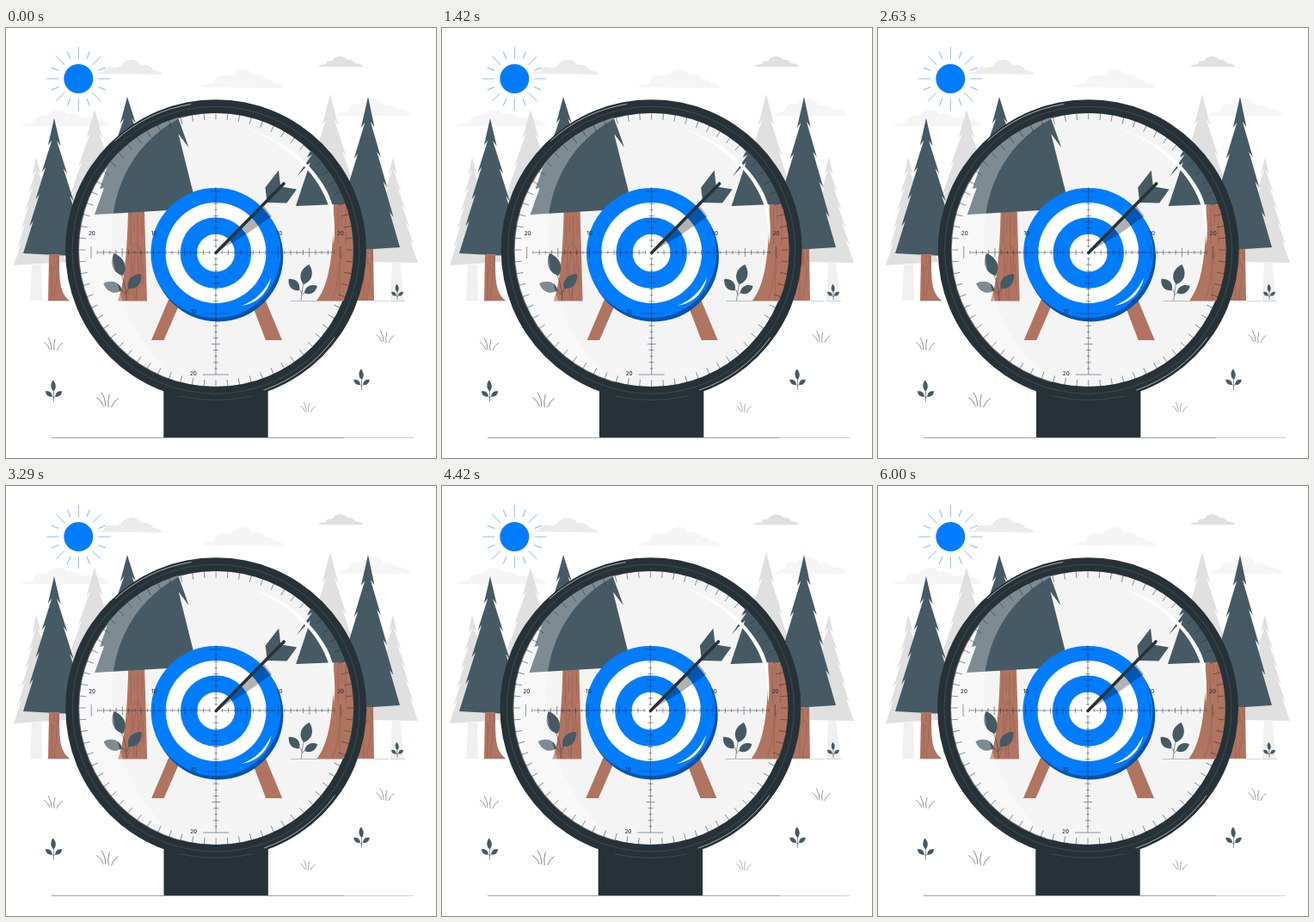
An HTML page that plays this animation: 500x500 px, repeating every 6.04 s.

```html
<!DOCTYPE html>
<html lang="en">
<head>
<meta charset="utf-8">
<style>
html, body { margin: 0; width: 100%; height: 100%; overflow: hidden; background: #fff; }
svg { display: block; width: 100vw; height: 100vh; }
text { font: 500 6.2px Inter, "Open Sans", sans-serif; fill: #263238; text-anchor: middle; }
.line { fill: none; stroke: #263238; stroke-width: .5; }
.grain { fill: none; stroke: #7c4a3c; stroke-width: .4; stroke-opacity: .8; }
.wood { fill: #b07461; }
.dark { fill: #455a64; }
.ink { fill: #263238; }
.blue { fill: #007cff; }
</style>
</head>
<body>
<svg viewBox="0 0 500 500">
  <defs><clipPath id="lens"><circle cx="244" cy="258" r="160"/></clipPath></defs>

  <g id="sky">
    <path fill="#ebebeb" d="M103 53c3-2 8-1 11-2 0-5 6-7 11-5 4 1 6-1 9-2 3-6 11-9 17-6 4 0 5 6 9 5 6-1 9 3 12 6 4 1 9 1 10 5z"/>
    <path fill="#f5f5f5" d="M228 69c2-5 10-3 14-5 0-7 8-11 15-9 4 1 6-1 8-3 7-6 18-6 22 3 6-3 13-1 16 5 4-2 8 1 9 4 5-1 10 1 11 6z"/>
    <path fill="#e0e0e0" d="M363 45c2-3 6-2 9-3 0-3 4-5 7-3 3-7 14-8 18-2 5-1 7 2 9 4 4 0 8 1 9 4z"/>
    <path fill="#f5f5f5" d="M18 114c2-5 10-3 14-5 1-6 9-8 15-7 7-9 19-9 24-2 6-2 14 0 18 5 12-3 28 2 32 9z"/>
    <path fill="#f5f5f5" d="M386 102c3-5 8-3 12-6 1-7 8-9 14-7 8-9 21-9 27 1 7-2 13 1 16 5 6-2 14 1 15 7z"/>
    <circle class="blue" cx="84.300" cy="59" r="17"/>
    <g id="rays" stroke="#007cff" stroke-width=".5"></g>
  </g>

  <g id="woods"></g>
  <path fill="#f0f0f0" d="M30 275h11l1 42H28zM449 272h9l5 45h-16z"/>
  <path class="wood" d="M50 263h12c0 30 0 45 12 54H49zM412 257h15l1 60h-23z"/>
  <path class="grain" d="M53 317V290c0-14 7-16 6 0s-4 14-2 27M56 265v9m-3 1v8m7-18v12M416 317V285c0-16 9-18 8 0s-5 18-4 32M416 259v13m4-13v18m5-17v10"/>
  <path class="line" stroke-opacity=".4" d="M48 317.500h26M428 317.500h17M447 317.500h17"/>
  <g id="grass" class="line"></g>
  <g id="sprouts"></g>

  <g id="scope">
    <path class="ink" d="M183.300 415h121.400v61H183.300z"/>
    <circle class="ink" cx="244" cy="258.200" r="175"/>
    <circle cx="244" cy="258" r="159" fill="#f4f4f4"/>
    <g clip-path="url(#lens)">
      <path class="wood" d="M142 213h19l3 104.500h-34c8-20 11-60 12-104.500zM381 203h30v114.500h-50c18-22 20-70 20-114.500z"/>
      <path class="grain" d="M145 216v38m4-35v20m4-22v42m5-40v24M146 264c0-18 12-18 11 5s-6 26-5 47M149 316c-2-26-1-55 3-52s0 28-1 52M140 317c5-11 6-25 6-53m13 10v25M386 209v42m4-44v22m5-22v45M388 317c0-19-1-45 4-56M379 316c7-12 9-38 9-62"/>
      <path class="line" stroke-opacity=".6" d="M331 317.500h30"/>
      <path class="dark" d="M103 217l11-31-5 1 19-55 30-45h30l12 17 12.500 35-12-16 17 68-30 21zM369 118l-19 32 6-3-18 26 16-17-17 51 73-3V130z"/>
      <g id="bushes"></g>

      <path class="wood" d="M189 316h15l-20.500 47H169zM284 316h17.500l19.500 47h-19z"/>
      <circle cx="246.500" cy="265.700" r="75.800" fill="#0053ad"/>
      <circle class="blue" cx="244" cy="261.500" r="75.600"/>
      <circle cx="244" cy="261.500" r="58.500" fill="#fff"/>
      <circle class="blue" cx="244" cy="261.500" r="41.300"/>
      <circle cx="244" cy="261.500" r="22" fill="#fff"/>
      <path d="M244 261l56-54 9 12-30 21z" opacity=".3"/>
      <path fill="#fff" d="M274 323c16-6 27-17 34.500-33-4 18-16 30-34.500 33z"/>
      <path class="dark" d="M317 165.500l-15.500 20 2 17 16-16zM303.500 203l23 .5 11.500-16-18-3z"/>
      <path d="M244 261.500L323 181" stroke="#263238" stroke-width="3.600" stroke-linecap="round"/>

      <path fill="#fff" opacity=".3" d="M210 101C150 128 123 185 123 240c0 80 37 140 82 172l-90 20-60-130V110l90-40z"/>
      <path fill="#fff" d="M266 114c44 8 84 36 104 70 5 8 8 16 10 24 2 15 3 29 1 44-1-18-2-31-5-43-7-21-17-36-31-50-22-22-46-38-79-45z"/>
    </g>
    <g id="marks" class="line"></g>
    <g id="numbers"></g>
    <g fill="none" stroke="#52656e" stroke-width=".5">
      <circle cx="244" cy="258.200" r="167"/>
      <path d="M202 428q42 9 84 0"/>
    </g>
    <path fill="none" stroke="#fff" stroke-width=".7" stroke-linecap="round" stroke-opacity=".85"
      d="M127 131A172.500 172.500 0 0 1 215 88.500M300 421A172 172 0 0 0 382 360"/>
  </g>
  <path class="line" stroke-opacity=".9" d="M53 476.500h340"/>
  <path class="line" stroke-opacity=".45" d="M393 476.500h81"/>
</svg>

<script>
const NS = 'http://www.w3.org/2000/svg';
const byId = id => document.getElementById(id);

function add(parent, tag, attrs, text) {
  const el = document.createElementNS(NS, tag);
  for (const key in attrs) el.setAttribute(key, attrs[key]);
  if (text) el.textContent = text;
  byId(parent).append(el);
}

// Jagged side of a conifer, from its tip to a lower corner.
function side([tipX, tipY], [baseX, baseY], tiers) {
  const points = [];
  const out = Math.sign(baseX - tipX);
  for (let i = 1; i <= tiers; i++) {
    const k = i / tiers;
    const x = tipX + (baseX - tipX) * k;
    const y = tipY + (baseY - tipY) * k;
    points.push([x, y]);
    if (i < tiers) points.push([x - out * 4.5, y - 6]);
  }
  return points;
}

function tree(tip, left, right, fill, tiers = 5) {
  const points = [tip, ...side(tip, right, tiers), ...side(tip, left, tiers).reverse()];
  add('woods', 'polygon', { points: points.join(' '), fill });
}

const PALE = '#e0e0e0', DARK = '#455a64';
tree([35, 150], [9, 276], [70, 272], PALE, 6);
tree([103, 95], [55, 262], [151, 262], PALE);
tree([450, 150], [420, 272], [479, 273], PALE, 6);
tree([377, 77], [330, 258], [424, 258], PALE);
tree([56, 105], [20, 262], [94, 266], DARK);
tree([141, 80], [100, 235], [190, 235], DARK);
tree([421, 80], [380, 260], [458, 255], DARK);

for (let i = 0; i < 16; i++) {
  const near = i % 2 ? 25 : 23, far = i % 2 ? 34 : 37;
  add('rays', 'path', { d: `M${near} 0H${far}`, transform: `translate(84.3 59) rotate(${i * 22.5})` });
}

for (const [x, y, size] of [[55, 375, 1], [118, 441, 1.15], [351, 447, .8], [441, 366, .95]])
  add('grass', 'path', {
    d: 'M-4-1q-2-6-7-9M-2-1q0-8-4-14M1 0q-1-7 1-13M4 0q2-6 7-9',
    transform: `translate(${x} ${y}) scale(${size})`
  });

// A leaf is an almond with its point on the stem.
function leaf(parent, x, y, length, width, angle) {
  add(parent, 'path', {
    class: 'dark',
    d: `M0 0C${-width} ${-length * .3} ${-width * .7} ${-length * .75} 0 ${-length}C${width * .7} ${-length * .75} ${width} ${-length * .3} 0 0z`,
    transform: `translate(${x} ${y}) rotate(${angle})`
  });
}

function sprout(x, y, size) {
  add('sprouts', 'path', { class: 'line', d: `M${x} ${y}v${-size * .65}M${x} ${y - size * .2}l${-size * .25} ${-size * .25}M${x} ${y - size * .2}l${size * .25} ${-size * .25}` });
  leaf('sprouts', x, y - size * .5, size * .52, size * .17, -4);
  leaf('sprouts', x - size * .07, y - size * .26, size * .4, size * .16, -52);
  leaf('sprouts', x + size * .07, y - size * .26, size * .4, size * .16, 52);
}
sprout(55.5, 435, 25);
sprout(413.5, 421, 24);
sprout(455, 316, 18);

add('bushes', 'path', { class: 'line', d: 'M140 317q0-18-6-30M139 310q-4-7-9-8M140 309q2-8 6-10M343 317q1-11 3-20M344 309q-1-5-4-6M344 311q3-4 6-5' });
leaf('bushes', 136, 288, 28, 11, -22);
leaf('bushes', 135, 305, 23, 9.5, -70);
leaf('bushes', 142, 303, 23, 9.5, 42);
leaf('bushes', 346, 298, 24, 10, 16);
leaf('bushes', 341, 305, 18, 8, -43);
leaf('bushes', 347, 308, 17, 7, 62);

const CX = 244, CY = 261, UNIT_X = 7.25, UNIT_Y = 7.1;
let ticks = `M107 ${CY}H238M250 ${CY}H381M${CX} 185V255M${CX} 267V403`;
for (let i = -20; i <= 20; i++) {
  const half = i % 10 === 0 ? 7 : i % 5 === 0 ? 5 : i % 2 ? 1.8 : 3;
  if (!i) continue;
  ticks += `M${CX + i * UNIT_X} ${CY - half}v${half * 2}`;
  if (i >= -10) {
    const w = i > 0 && i % 10 === 0 ? 15 : half;
    ticks += `M${CX - w} ${CY + i * UNIT_Y}h${w * 2}`;
  }
}
add('marks', 'path', { d: ticks });
for (let a = 0; a < 360; a += 5)
  add('marks', 'path', { d: 'M151.500 0H160', transform: `translate(244 258) rotate(${a})` });

for (const [x, y, label] of [[100, 241, 20], [172, 241, 10], [318, 241, 10], [389, 241, 20], [218, 332, 10], [218, 403.5, 20]])
  add('numbers', 'text', { x, y }, String(label));

// Linear sideways shake: one offset per tenth of the cycle.
const SHAKE = [0, -1, 2, -4, 4, -4, 4, -4, 2, -1, 0];
const LOOP = 6040, CYCLE = 6000, STEP = 1000 / 24;

function draw(time) {
  const frame = Math.floor((time % LOOP + 5) / STEP);
  const phase = Math.min((frame + .5) * STEP / CYCLE, .9999) * 10;
  const i = Math.floor(phase);
  const shift = SHAKE[i] + (SHAKE[i + 1] - SHAKE[i]) * (phase - i);
  byId('scope').setAttribute('transform', `translate(${shift.toFixed(3)} 0)`);
}

const start = performance.now();
function tick() {
  draw(performance.now() - start);
  requestAnimationFrame(tick);
}
tick();
</script>
</body>
</html>
```
